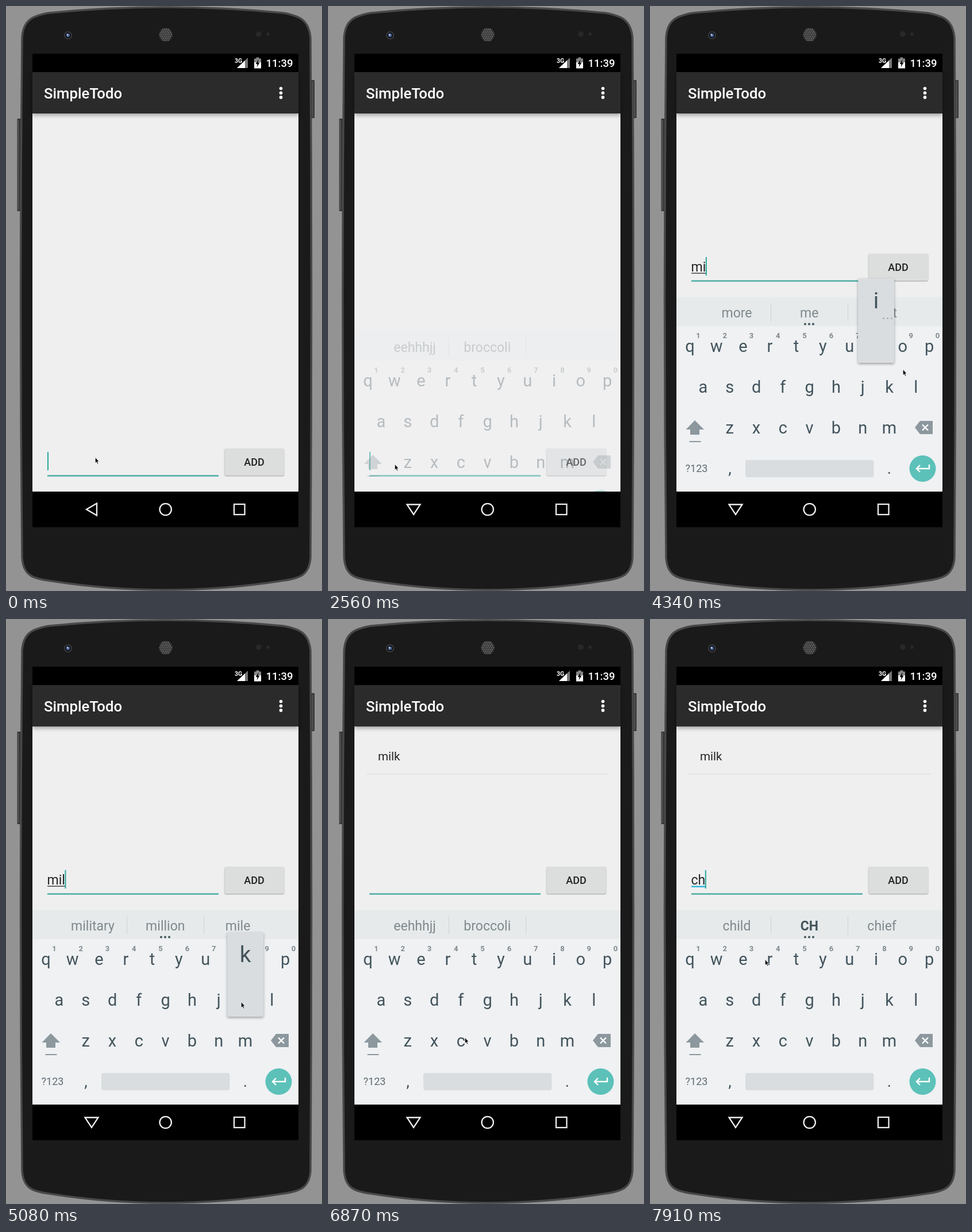
An HTML page with a canvas for the animation above (8 s loop, 550 px wide and 1018 px high).

```html
<!DOCTYPE html>
<html lang="en">
<head>
<meta charset="utf-8">
<title>Todo app on a phone</title>
<style>
html, body { margin: 0; width: 100%; height: 100%; overflow: hidden; background: #939393; }
canvas { display: block; }
</style>
</head>
<body>
<canvas id="stage" width="550" height="1018"></canvas>
<script>
const ctx = document.getElementById('stage').getContext('2d');
const LOOP = 8000, STEP = 148.57, KEYBOARD_SHIFT = -339;
const INK = '#43545c', MUTED = '#7f898d', TEAL = '#4bada2', PANEL = '#eff1f3', KEY_FILL = '#d9dde0';

const edits = [[0, ''], [8, ''], [17, ''], [19, ''], [26, 'm'], [29, 'mi'], [33, 'mil'],
  [36, 'milk'], [42, ''], [48, 'c'], [51, 'ch']];
const suggestions = [[0, 'eehhhjj|broccoli|'], [26, 'more|me|most'], [30, 'might|mind|miss'],
  [33, 'military|million|mile'], [36, 'milks|milk|milky'], [42, 'eehhhjj|broccoli|'],
  [48, 'can|C|could'], [51, 'child|CH|chief']];
const presses = [['m', 25, 26], ['i', 28, 29], ['l', 31, 32], ['k', 34, 35], ['c', 47, 48], ['h', 50, 51]];
const pointerPath = [[0, 155, 785], [4, 135, 792], [8, 134, 793], [14, 116, 797], [18, 116, 797],
  [24, 407, 716], [25, 412, 730], [26, 412, 728], [28, 394, 595], [29, 440, 632], [30, 460, 656],
  [32, 460, 658], [34, 409, 666], [35, 409, 664], [39, 426, 458], [42, 426, 458], [46, 238, 728],
  [48, 231, 733], [50, 322, 662], [51, 318, 660], [53, 200, 592]];

const keys = {};
[['qwertyuiop', 69.4, 602], ['asdfghjkl', 92.5, 673], ['zxcvbnm', 138.7, 744]].forEach(([row, x, y]) =>
  [...row].forEach((letter, i) => keys[letter] = { x: x + i * 46.3, y }));

const latest = (list, step) => list.filter(entry => entry[0] <= step).pop();

function rect(x, y, w, h, color, radius = 0) {
  ctx.fillStyle = color;
  ctx.beginPath();
  ctx.roundRect(x, y, w, h, radius);
  ctx.fill();
}

function disc(x, y, r, color) {
  ctx.fillStyle = color;
  ctx.beginPath();
  ctx.arc(x, y, r, 0, Math.PI * 2);
  ctx.fill();
}

function shape(d, fill, stroke, width) {
  const path = new Path2D(d);
  if (fill) { ctx.fillStyle = fill; ctx.fill(path); }
  if (stroke) { ctx.strokeStyle = stroke; ctx.lineWidth = width; ctx.stroke(path); }
}

function text(string, x, y, size, color, align = 'left', weight = 400) {
  ctx.font = `${weight} ${size}px Roboto, sans-serif`;
  ctx.textAlign = align;
  ctx.fillStyle = color;
  ctx.fillText(string, x, y);
  return ctx.measureText(string).width;
}

function withShadow(blur, offset, draw) {
  ctx.save();
  ctx.shadowColor = 'rgba(0,0,0,.35)';
  ctx.shadowBlur = blur;
  ctx.shadowOffsetY = offset;
  draw();
  ctx.restore();
}

function drawPhone() {
  rect(0, 0, 550, 1018, '#939393');
  rect(19.5, 196, 8, 161, '#343434', 1);
  rect(20.5, 198, 2, 157, '#555');
  rect(529, 129, 8, 66, '#343434', 1);
  rect(533, 131, 2, 62, '#555');
  shape('M28 55C30 25 45 17 75 12Q277 -8 482 12C512 17 527 25 530 55Q533 510 530 960' +
    'C528 990 512 996 482 1000Q277 1032 75 1000C45 996 30 990 28 960Q23 510 28 55Z', '#1a1a1a', '#484848', 3.5);

  disc(108, 51, 7, '#3b3d40');
  disc(108, 51, 5.2, '#10131c');
  disc(108, 51, 3, '#506a9c');
  disc(107, 50, 1.4, '#b9c8e4');
  disc(278, 50, 12, '#303030');
  for (let row = -3; row <= 3; row++) {
    for (let col = -4; col <= 4; col++) {
      const x = (col + (row & 1) / 2) * 3.3, y = row * 3.1;
      if (Math.hypot(x, y) < 11) disc(278 + x, 50 + y, 1.1, '#777');
    }
  }
  disc(440, 49, 5, '#282828');
  disc(456, 49, 3, '#282828');
}

function drawStatusBar() {
  rect(46, 83, 463, 32, '#000');
  shape('M402 108L421 90V108Z', '#777');
  shape('M402 108L416 94.7V108Z', '#fff');
  text('3G', 398, 98.5, 10.5, '#fff', 'left', 700);
  rect(435.5, 89.5, 5, 3, '#888');
  rect(432, 91.5, 12, 7, '#888');
  rect(432, 98, 12, 10.5, '#fff');
  shape('M439.5 93L434.5 101H437.5L436.5 106.5L441.5 98.5H438.5Z', '#000');
  text('11:39', 452.5, 106, 18.5, '#fff', 'left', 500);
}

function drawAppBar() {
  withShadow(7, 3, () => rect(46, 115, 463, 72, '#2b2b2b'));
  text('SimpleTodo', 66, 160.5, 25.7, '#fff', 'left', 500);
  [143.5, 151.2, 158.9].forEach(y => disc(478.5, y, 2.8, '#fff'));
}

function drawForm(step, raised) {
  const [editStep, value] = latest(edits, step);
  const pressed = step === 41;
  ctx.save();
  if (raised) ctx.translate(0, KEYBOARD_SHIFT);
  rect(72, 816.3, 298, 2.4, TEAL);
  const width = text(value, 71.5, 801, 23.1, '#252525');
  if (value) {
    const corrected = value === 'ch';
    rect(72, 803.3, width, corrected ? 2.6 : 1.4, corrected ? '#38b8dc' : '#333');
  }
  if (step - editStep < 4) rect(72 + (value ? width - 1 : 0), 776, 2, 32, '#2aa89c');
  withShadow(2, 1, () => rect(380.5, 770, 103.5, 47, pressed ? '#c8cbca' : '#dcdedd', 3));
  text('ADD', 432, 800, 18, '#222', 'center', 500);
  ctx.restore();
}

function drawSuggestions(step) {
  rect(46, 507, 463, 50, '#e6eaeb');
  rect(210, 517, 1, 32, '#cdd3d5');
  rect(344, 517, 1, 32, '#cdd3d5');
  const words = latest(suggestions, step)[1].split('|');
  words.forEach((word, i) => {
    const strong = /^[A-Z]+$/.test(word);
    text(word, 151 + i * 126.3, 542, 23, strong ? INK : MUTED, 'center', strong ? 700 : 400);
  });
  if (words[2]) [270, 277, 284].forEach(x => disc(x, 553.5, 2, INK));
}

function drawKeys() {
  for (const [letter, { x, y }] of Object.entries(keys)) text(letter, x, y, 29, INK, 'center');
  [...'1234567890'].forEach((digit, i) => text(digit, 83.9 + i * 46.3, 577.5, 13, MUTED, 'center', 700));
  shape('M78 721L94 737H86V746H70V737H62.5Z', '#8c989e');
  rect(68.5, 757, 20, 2, '#8c989e');
  shape('M461 733.5L470 722H492V745H470Z', '#8c989e');
  shape('M474 728.5L484 738.5M484 728.5L474 738.5', null, '#fff', 2.4);
  text('?123', 81, 811, 18, '#5f6c72', 'center');
  text(',', 139, 814, 28, INK, 'center');
  text('.', 416.5, 814, 28, INK, 'center');
  rect(166, 790, 223.5, 30, KEY_FILL, 4);
  disc(474.5, 805, 23, '#5cc1b9');
  shape('M486 798V805H464M470 799L464 805L470 811', null, '#fff', 2.4);
}

function drawKeyPreview(step) {
  const press = presses.find(([, from, to]) => step >= from && step <= to);
  if (!press) return;
  const [letter] = press, { x, y } = keys[letter];
  withShadow(4, 2, () => rect(x - 31.5, y - 128, 63, 147, KEY_FILL, 2));
  text(letter, x, y - 76, 39, INK, 'center');
  if ('ic'.includes(letter)) [13, 20, 27].forEach(dx => disc(x + dx, y - 58.5, 1.5, '#a5afb4'));
}

function drawKeyboard(step, progress) {
  ctx.save();
  ctx.beginPath();
  ctx.rect(46, 187, 463, 658);
  ctx.clip();
  ctx.globalAlpha = progress;
  ctx.translate(0, (1 - progress) * 90);
  rect(46, 507, 463, 338, PANEL);
  drawSuggestions(step);
  drawKeys();
  drawKeyPreview(step);
  ctx.restore();
}

function drawNavigation(keyboardOpen) {
  rect(46, 845, 463, 62, '#000');
  shape(keyboardOpen ? 'M137.5 867.5H160.5L149 885Z' : 'M140 876L158 865.5V886.5Z', null, '#eee', 2.3);
  ctx.beginPath();
  ctx.arc(277.7, 876, 10.2, 0, Math.PI * 2);
  ctx.stroke();
  ctx.strokeRect(397, 867, 18.5, 18);
}

function drawPointer(step) {
  const from = latest(pointerPath, step);
  const to = pointerPath.find(point => point[0] > step) || from;
  const part = to === from ? 0 : (step - from[0]) / (to[0] - from[0]);
  ctx.save();
  ctx.translate(from[1] + (to[1] - from[1]) * part, from[2] + (to[2] - from[2]) * part);
  shape('M.3 .5V10.3L2.5 8.4L4.1 12L5.7 11.3L4.2 7.8H7Z', '#000', '#fff', .7);
  ctx.restore();
}

function render(time) {
  const step = time < 150 ? 0 : Math.max(1, Math.floor((time - 28) / STEP));
  const keyboard = Math.min(1, Math.max(0, (step - 16) / 3));
  drawPhone();
  rect(46, 187, 463, 658, '#efefef');
  drawStatusBar();
  drawAppBar();
  if (step >= 42) {
    text('milk', 87, 246, 20.6, '#252525');
    rect(67, 269.3, 421, 1.2, '#dcdedd');
  }
  drawForm(step, keyboard === 1);
  if (keyboard) drawKeyboard(step, keyboard);
  drawNavigation(keyboard > 0);
  drawPointer(step);
}

function tick() {
  render(performance.now() % LOOP);
  requestAnimationFrame(tick);
}
tick();
</script>
</body>
</html>
```
